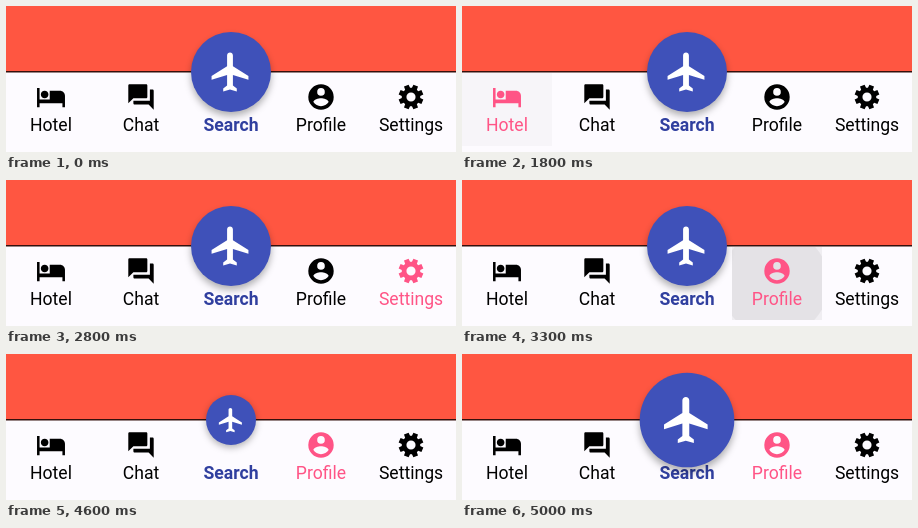
Write an HTML page that moves like this. It is 450 px wide and 146 px high and loops after 5100 ms.

```html
<!DOCTYPE html>
<html lang="en">
<head>
<meta charset="utf-8">
<title>Bottom bar</title>
<style>
  html, body { margin: 0; width: 100%; height: 100%; overflow: hidden; background: #fdfbff; }
  svg { display: block; width: 100%; height: 100%; }
  text { font: 17.6px Roboto, sans-serif; text-anchor: middle; }
  .main { font-weight: 700; fill: #303f9f; }
</style>
</head>
<body>
<svg id="stage" viewBox="0 0 450 146">
  <defs>
    <clipPath id="cell"><rect id="cellBox" y="67" width="90" height="73"/></clipPath>
    <filter id="blur" x="-30%" y="-30%" width="160%" height="160%">
      <feGaussianBlur stdDeviation="3.5"/>
    </filter>
  </defs>
  <rect width="450" height="146" fill="#fdfbff"/>
  <rect width="450" height="65.5" fill="#ff5641"/>
  <rect y="65" width="450" height="1.5" fill="#35100c"/>
  <g id="ripple" clip-path="url(#cell)">
    <rect width="450" height="146" fill-opacity=".05"/>
    <circle id="wave" fill-opacity=".05"/>
  </g>
  <g id="items"></g>
  <text class="main" x="225" y="125">Search</text>
  <circle id="shade" cx="225" fill-opacity=".3" filter="url(#blur)"/>
  <g id="fab">
    <circle r="40" fill="#3f51b9"/>
    <path fill="#fff" transform="translate(-1 0) scale(1.94) translate(-11.5 -12)"
      d="M21 16v-2l-8-5V3.5C13 2.67 12.33 2 11.5 2S10 2.67 10 3.5V9l-8 5v2l8-2.5V19l-2 1.5V22l3.5-1 3.5 1v-1.5L13 19v-5.5z"/>
  </g>
</svg>
<script>
const LOOP = 5100, STEP = 100, BOUNCE = 4600;
const INK = '#000', PINK = '#ff5486';
const $ = id => document.getElementById(id);

// Gear outline: eight flared teeth around a hub.
function gear(teeth = 8, outer = 9.9, inner = 7.3, hole = 3.6) {
  const at = (r, a) => `${(12 + r * Math.sin(a)).toFixed(2)} ${(12 - r * Math.cos(a)).toFixed(2)}`;
  const pts = [];
  for (let i = 0; i < teeth; i++) {
    const mid = (i + 0.5) * 2 * Math.PI / teeth;
    pts.push(at(inner, mid - 0.29), at(outer, mid - 0.2), at(outer, mid + 0.2), at(inner, mid + 0.29));
  }
  return `M${pts.join('L')}zM12 ${12 + hole}a${hole} ${hole} 0 1 1 0 ${-2 * hole} ${hole} ${hole} 0 0 1 0 ${2 * hole}z`;
}

const items = [
  { label: 'Hotel', x: 45, icon: 'M7 13c1.66 0 3-1.34 3-3S8.66 7 7 7s-3 1.34-3 3 1.34 3 3 3zm12-6h-8v7H3V5H1v15h2v-3h18v3h2v-9c0-2.21-1.79-4-4-4z' },
  { label: 'Chat', x: 135, icon: 'M21 6h-2v9H6v2c0 .55.45 1 1 1h11l4 4V7c0-.55-.45-1-1-1zm-4 6V3c0-.55-.45-1-1-1H3c-.55 0-1 .45-1 1v14l4-4h10c.55 0 1-.45 1-1z' },
  { label: 'Profile', x: 315, icon: 'M12 2a10 10 0 1 0 0 20 10 10 0 0 0 0-20zm0 3a3 3 0 1 1 0 6 3 3 0 0 1 0-6zm0 14.2a7.2 7.2 0 0 1-6-3.22c.03-1.99 4-3.08 6-3.08s5.97 1.09 6 3.08a7.2 7.2 0 0 1-6 3.22z' },
  { label: 'Settings', x: 405, icon: gear() }
];
const taps = [
  { item: 0, at: 1400, x: 45, y: 100, r: 46 },
  { item: 3, at: 2300, x: 411, y: 97, r: 43 },
  { item: 2, at: 3300, x: 313, y: 103, r: 54 }
];

$('items').innerHTML = items.map(({ label, x, icon }) => `<g>
  <path fill-rule="evenodd" transform="translate(${x} 91) scale(1.27) translate(-12 -12)" d="${icon}"/>
  <text x="${x}" y="125">${label}</text></g>`).join('');
const groups = [...$('items').children];

const clamp = v => Math.max(0, Math.min(1, v));

// Underdamped spring from 1 towards 0.
function spring(t, stiffness = 50, ratio = 0.2) {
  const w = Math.sqrt(stiffness), k = Math.sqrt(1 - ratio * ratio), a = w * k * t;
  return Math.exp(-ratio * w * t) * (Math.cos(a) + ratio / k * Math.sin(a));
}

function set(el, attrs) {
  for (const name in attrs) el.setAttribute(name, attrs[name]);
}

function draw(t) {
  const tap = taps.filter(p => t >= p.at).pop();
  groups.forEach((g, i) => set(g, { fill: tap && tap.item === i ? PINK : INK }));

  const age = tap ? t - tap.at : Infinity;
  set($('ripple'), { opacity: clamp((450 - age) / 200) });
  if (tap) {
    set($('cellBox'), { x: items[tap.item].x - 45 });
    set($('wave'), { cx: tap.x, cy: tap.y, r: tap.r + 25 * clamp(age / 125) });
  }

  const scale = t < BOUNCE ? 1 : 1 - 0.375 * spring((t - BOUNCE) / 1000);
  set($('fab'), { transform: `translate(225 66) scale(${scale})` });
  set($('shade'), { cy: 66 + 4 * scale, r: 40 * scale });
}

const start = performance.now();
function tick() {
  const t = (performance.now() - start) % LOOP;
  draw(Math.floor(t / STEP) * STEP);
  requestAnimationFrame(tick);
}
draw(0);
requestAnimationFrame(tick);
</script>
</body>
</html>
```
